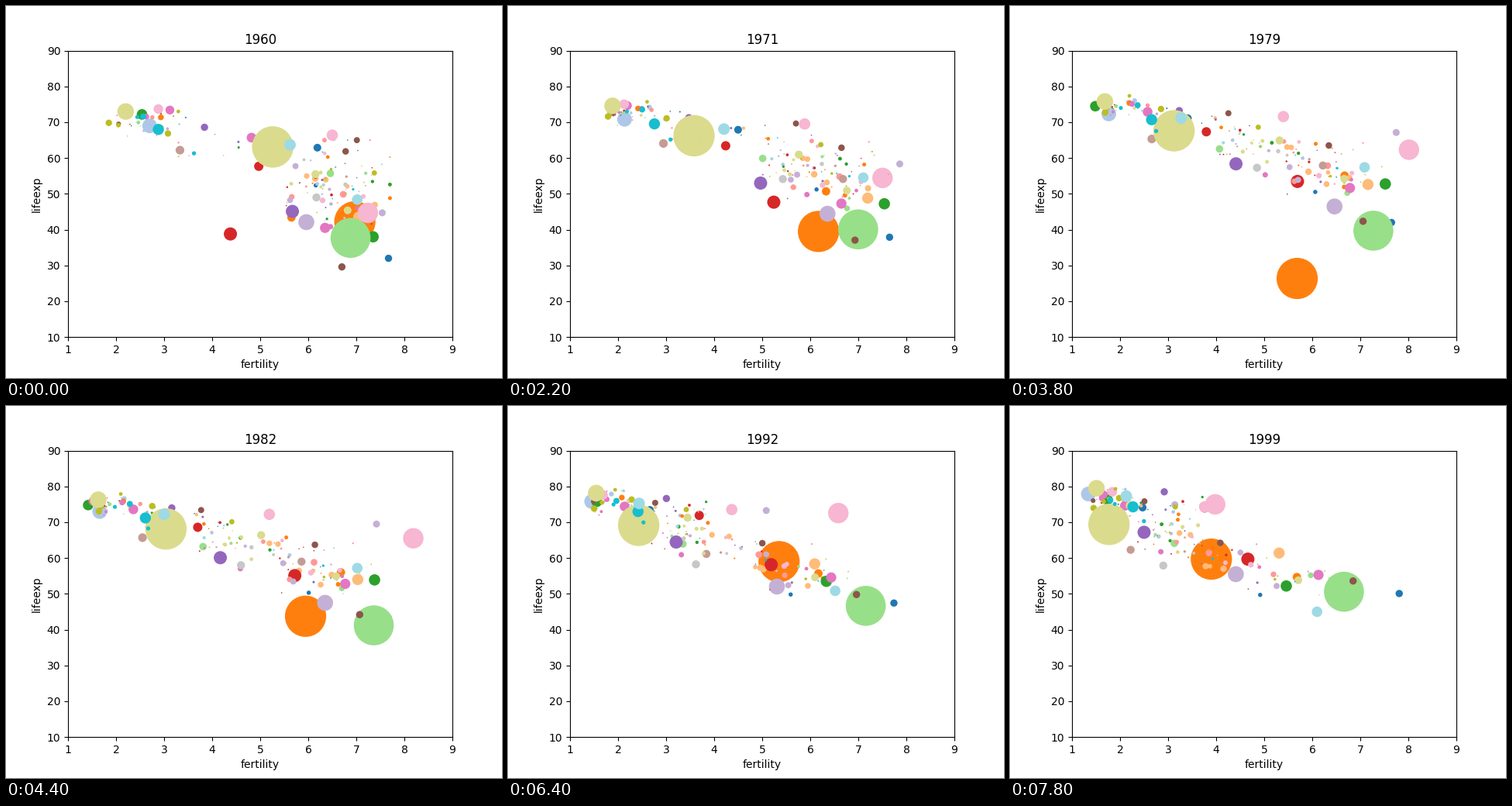
A matplotlib script that plays this animation: 640x480 px, repeating every 8000 ms.

```python
import numpy as np
import matplotlib.pyplot as plt
from matplotlib.animation import FuncAnimation

START, COUNT = 1960, 40
YEARS = np.arange(START, START + COUNT)
AGE = (YEARS - START) / (COUNT - 1)
RISE = np.sin(AGE * np.pi / 2)  # ease-out from 0 to 1

# tab20 colour indices
(BLUE, LBLUE, ORANGE, LORANGE, GREEN, LGREEN, RED, SALMON, PURPLE, LILAC,
 BROWN, TAN, PINK, LPINK, GREY, LGREY, OLIVE, LOLIVE, CYAN, LCYAN) = range(20)

bubbles = []  # (colour, radius in px, fertility per year, life expectancy per year)


def smooth(keys, values):
    """Cubic Hermite curve through the key values, sampled once a year."""
    keys, values = np.asarray(keys, float), np.asarray(values, float)
    slope = np.gradient(values, keys)
    i = np.clip(np.searchsorted(keys, YEARS, side="right") - 1, 0, len(keys) - 2)
    h = keys[i + 1] - keys[i]
    u = (YEARS - keys[i]) / h
    return ((2 * u**3 - 3 * u**2 + 1) * values[i] + (3 * u**2 - 2 * u**3) * values[i + 1]
            + (u**3 - 2 * u**2 + u) * h * slope[i] + (u**3 - u**2) * h * slope[i + 1])


def track(colour, radius, *points, keys=(1960, 1982, 1999)):
    """A bubble that glides through a few (fertility, life expectancy) points."""
    fert, life = zip(*points)
    bubbles.append((colour, radius, smooth(keys, fert), smooth(keys, life)))


# The largest bubbles
LONG = (1960, 1967, 1975, 1987, 1999)
track(LOLIVE, 26.7, (5.26, 63.1), (3.99, 65.4), (3.31, 66.9), (2.83, 68.8), (1.77, 69.4), keys=LONG)
track(LGREEN, 25.8, (6.88, 37.7), (6.88, 41.1), (7.14, 38.8), (7.39, 44), (6.66, 50.6), keys=LONG)
track(LPINK, 13.2, (7.24, 44.7), (7.28, 50.8), (7.75, 58.2), (7.94, 70), (3.98, 75), keys=LONG)

# One large bubble loses decades of life expectancy for a few years
dip = 34 * np.exp(-(YEARS - 1976.7) ** 2 / 27)
bubbles.append((ORANGE, 26.6, smooth(LONG, (6.97, 6.74, 5.63, 6.07, 3.9)), 42.2 + 17.5 * RISE - dip))

# Medium bubbles
track(LOLIVE, 10.7, (2.2, 73), (1.63, 76.3), (1.51, 79.5))
track(LILAC, 10.3, (5.96, 42.1), (6.35, 47.5), (4.41, 55.5))
track(LBLUE, 9.5, (2.7, 69), (1.66, 73), (1.34, 77.9))
track(RED, 8.5, (4.38, 38.8), (5.72, 55.1), (4.66, 59.7))
track(PURPLE, 8.5, (5.67, 45.1), (4.17, 60.1), (2.5, 67.2))
track(LPINK, 7.3, (6.5, 66.4), (5.19, 72.2), (3.76, 74.3))
track(LCYAN, 7.5, (5.62, 63.7), (3, 72.2), (2.13, 77.3))
track(CYAN, 7.2, (2.88, 68), (2.61, 71.2), (2.27, 74.3))
track(GREEN, 7.3, (7.35, 38), (7.38, 53.9), (5.46, 52.2))
track(GREEN, 6.8, (2.54, 72.2), (1.42, 74.8), (1.74, 76.3))
track(LPINK, 6.2, (2.88, 73.7), (1.6, 76.4), (1.84, 78.5))
track(PINK, 6.3, (4.82, 65.7), (2.36, 73.6), (2.1, 74.6))
track(RED, 6, (4.97, 57.7), (3.7, 68.6), (3.76, 74))
track(PINK, 6.6, (6.35, 40.5), (6.77, 52.8), (6.13, 55.3))
track(TAN, 5.6, (3.33, 62.2), (2.55, 65.7), (1.9, 67))
track(TAN, 5.2, (7, 48.4), (5.86, 59), (2.22, 62.3))
track(LORANGE, 7.2, (7.05, 43.5), (7.03, 54), (5.31, 61.4))
track(LCYAN, 6.8, (7.02, 48.4), (7.02, 57.2), (6.1, 45))
track(LGREY, 5.2, (6.17, 49), (4.6, 58), (2.9, 57.9))
track(LOLIVE, 5.2, (6.15, 55.5), (5.02, 66.4), (2.2, 74.7))
track(LOLIVE, 5, (6.82, 45.4), (6.58, 54.9), (5.71, 53.8))
track(BROWN, 4.7, (6.7, 29.6), (7.07, 44.2), (6.85, 53.6))
track(BLUE, 4.7, (7.67, 32), (7.66, 43.4), (7.81, 50.1))
track(BLUE, 5, (6.19, 62.9), (3.12, 72), (2.47, 74.1))
track(PURPLE, 4.7, (3.84, 68.6), (3.16, 74), (2.92, 78.5))
track(PINK, 5.7, (3.12, 73.4), (1.52, 75.9), (1.65, 77.7))
track(ORANGE, 5.4, (5.65, 43.4), (6.68, 56), (5.68, 54.7))
track(LGREEN, 4.8, (6.46, 55.7), (3.81, 63.2), (3.13, 64.1))
track(LILAC, 4.5, (7.54, 44.7), (7.42, 69.5), (3.14, 74.9))


def falling(high, low, when):
    """Fertility that stays near high, then drops to low around one year."""
    drop = 1 / (1 + np.exp((when - YEARS) / 7))
    return high - (high - low) * (drop - drop[0])


# The small bubbles: early, middling and late in the change to small families
rng = np.random.default_rng(11)
SHADES = [c for c in range(20) if c != GREY]
for _ in range(128):
    kind = rng.choice(3, p=[0.27, 0.1, 0.63])
    a, b, c, d = np.clip(rng.normal(0, 1, 4), -2, 2)
    if kind == 0:
        when = rng.uniform(1960, 1990)
        high, low = 2.65 + 0.4 * a, 1.6 + 0.2 * c
        life = 69.5 + 1.8 * b, 75.5 + 2.2 * d
    elif kind == 1:
        when = rng.uniform(1965, 1985)
        high, low = 4.3 + 0.5 * a, 2.1 + 0.3 * c
        life = 63 + 3 * b, 73 + 2 * d
    else:
        when = rng.uniform(1968, 2012)
        high, low = 6.6 + 0.55 * a, 2.4 + 0.4 * c
        life = 52 + 6.5 * b, 74 - 0.5 * (when - 1968) + 3 * d
    radius = 0.8 + 3.6 * rng.random() ** 2.2
    bubbles.append((rng.choice(SHADES), radius, falling(high, low, when),
                    life[0] + (life[1] - life[0]) * RISE))

bubbles.sort(key=lambda b: b[0])
paths = np.array([[b[2], b[3]] for b in bubbles])
radii = np.array([b[1] for b in bubbles])
palette = plt.get_cmap("tab20").colors

DPI = 100
fig, ax = plt.subplots(figsize=(6.4, 4.8), dpi=DPI)
ax.set(xlim=(1, 9), ylim=(10, 90), xlabel="fertility", ylabel="lifeexp")
title = ax.set_title(str(START))
dots = ax.scatter(paths[:, 0, 0], paths[:, 1, 0], s=(2 * radii * 72 / DPI) ** 2,
                  c=[palette[b[0]] for b in bubbles], linewidths=0)


def update(frame):
    dots.set_offsets(paths[:, :, frame])
    title.set_text(str(YEARS[frame]))
    return dots, title


anim = FuncAnimation(fig, update, frames=COUNT, interval=200, repeat=True, repeat_delay=0)
plt.show()
```
